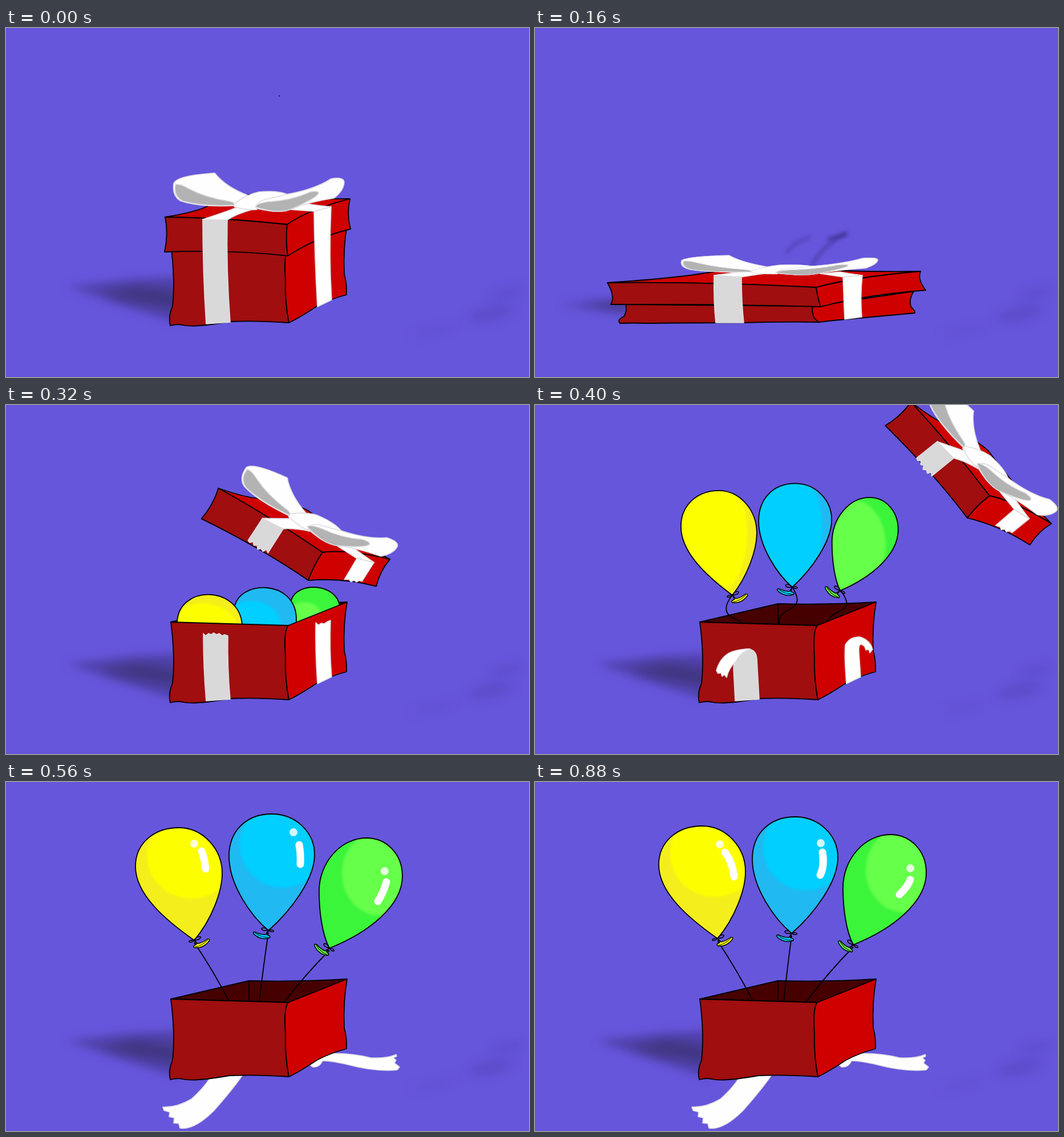
Animation, 917 px wide and 611 px high, one loop 0.96 s. Source, as an HTML page with a canvas:

```html
<!DOCTYPE html>
<html>
<head>
<meta charset="utf-8">
<style>
html, body { margin: 0; overflow: hidden; background: #6656dc; }
canvas { display: block; }
</style>
</head>
<body>
<canvas id="stage" width="917" height="611"></canvas>
<script>
const ctx = document.getElementById('stage').getContext('2d');
const STEP = 80, STEPS = 12;
const RED = '#cf0000', DARK = '#a00e0f', INSIDE = '#470000';
const WHITE = '#fefefe', GREY = '#d9d9d9', EDGE = '#dedee2';

const lerp = (a, b, k) => a + (b - a) * k;
const mix = (a, b, k) => a.map((v, i) => lerp(v, b[i], k));

// Blend two path strings of equal structure
function morph([a, b], k) {
  const end = b.match(/[\d.]+/g);
  let i = 0;
  return a.replace(/[\d.]+/g, v => lerp(+v, +end[i++], k).toFixed(2));
}

function shape(d, fill, stroke = '#000', width = 1.8) {
  const path = new Path2D(d);
  if (fill) { ctx.fillStyle = fill; ctx.fill(path); }
  if (stroke) { ctx.strokeStyle = stroke; ctx.lineWidth = width; ctx.stroke(path); }
}
const ribbon = (d, fill = WHITE) => shape(d, fill, EDGE, 1.6);

function blurred(radius, draw) {
  ctx.save();
  ctx.filter = `blur(${radius}px)`;
  draw();
  ctx.restore();
}

function ellipse(x, y, rx, ry, turn = 0) {
  ctx.beginPath();
  ctx.ellipse(x, y, rx, ry, turn, 0, 7);
}

// Each part: standing shape, flattened shape
const box = {
  shadow: ['M108 453 L210 441 L305 435 L305 518 L205 486Z', 'M42 485 L100 479 L165 475 L165 499 L100 492Z'],
  core: ['M165 465 L230 452 L300 462 L300 492 L230 480Z', 'M90 486 L130 482 L165 482 L165 494 L130 491Z'],
  front: ['M289 380 L495 386 Q487 395 490 440 Q489 480 496 516 Q440 512 392 514 Q330 525 310 520 Q300 518 288 521 Q284 505 292 487 Q297 440 289 380Z',
    'M159 484 L487 487 Q485 495 488 502 Q487 507 498 515 Q440 514 366 516 Q250 516 200 517 Q170 516 149 517 Q143 511 156 505 Q162 495 159 484Z'],
  side: ['M495 386 L598 345 Q591 385 593 430 Q598 450 597 467 Q570 474 545 487 Q515 507 496 516 Q489 480 490 440 Q487 395 495 386Z',
    'M487 487 L664 461 Q655 475 659 488 Q667 495 666 499 Q620 503 545 510 Q520 512 498 515 Q487 507 488 502 Q485 495 487 487Z'],
  top: ['M279 331 Q335 322 355 311 Q425 288 440 292 Q500 300 603 299 Q530 318 493 344 Q380 332 279 331Z',
    'M127 446 Q260 437 316 426 Q370 419 440 420 Q560 428 676 426 Q560 436 493 454 Q300 444 127 446Z'],
  lidFront: ['M279 331 Q380 332 493 344 Q490 370 494 399 Q400 388 278 392 Q285 360 279 331Z',
    'M127 446 Q300 444 493 454 Q495 470 501 488 Q330 483 133 484 Q141 470 127 446Z'],
  lidSide: ['M493 344 Q530 318 603 299 Q597 325 604 352 Q545 366 494 399 Q490 370 493 344Z',
    'M493 454 Q560 436 676 426 Q670 440 685 459 Q580 467 501 488 Q495 470 493 454Z'],
};
const bands = [
  [GREY, 'M345 335 L388 336 Q386 420 393 515 L351 518 Q345 430 345 335Z', 'M314 433 L362 437 Q362 480 366 516 L317 516 Q313 480 314 433Z'],
  [WHITE, 'M345 335 Q385 322 405 314 L432 318 Q405 325 388 336Z', 'M314 433 Q350 428 380 424 L420 428 Q390 431 362 436Z'],
  [WHITE, 'M540 321 L570 313 Q566 400 571 476 L546 488 Q541 400 540 321Z', 'M540 435 L574 433 Q570 470 573 506 L543 510 Q541 470 540 435Z'],
  [WHITE, 'M500 318 L525 307 Q540 310 570 313 L540 321Z', 'M500 430 L535 427 Q550 430 574 433 L540 436Z'],
];

function bow() {
  ribbon('M366 254 Q300 258 294 272 Q291 295 307 303 Q340 314 402 311 L424 293 Q385 278 366 254Z');
  ribbon('M297 274 Q293 294 310 303 Q345 313 400 310 Q402 305 390 303 Q350 297 320 281 Q305 272 297 274Z', '#b3b3b3');
  ribbon('M437 310 Q450 296 493 291 Q540 283 570 264 Q592 260 593 270 Q592 285 575 298 Q530 305 500 317 Q488 322 468 321 Q445 318 437 315Z');
  ribbon('M400 308 Q420 292 443 287 Q475 284 493 291 Q470 297 455 300 Q437 305 440 318 Q420 319 400 313Z');
  ribbon('M437 313 Q440 307 460 304 Q500 302 533 287 Q548 284 548 289 Q545 298 500 317 Q490 322 470 321 Q450 318 437 313Z', '#b3b3b3');
}

function shadow(k) {
  blurred(8, () => shape(morph(box.shadow, k), 'rgba(58,46,122,.5)', null));
  blurred(9, () => shape(morph(box.core, k), 'rgba(55,45,100,.6)', null));
  blurred(9, () => {
    ctx.fillStyle = 'rgba(60,48,140,.22)';
    for (const [x, y, rx, ry] of [[850, 500, 42, 13], [878, 464, 30, 8], [750, 530, 40, 3]]) {
      ellipse(x, y, rx, ry, -.2);
      ctx.fill();
    }
  });
}

function lid(k) {
  shape(morph(box.top, k), RED);
  shape(morph(box.lidFront, k), DARK);
  shape(morph(box.lidSide, k), RED);
}

function closedBox(k) {
  shape(morph(box.front, k), DARK);
  shape(morph(box.side, k), RED);
  lid(k);
  for (const [fill, ...pair] of bands) ribbon(morph(pair, k), fill);
  ctx.save();
  ctx.translate(-81 * k, 267 * k);
  ctx.scale(1 + .15 * k, 1 - .485 * k);
  bow();
  ctx.restore();
}

function flyingLid(x, y, degrees, dx, dy) {
  ctx.save();
  ctx.translate(x, y);
  ctx.rotate(degrees * Math.PI / 180);
  ctx.translate(-493, -344);
  lid(0);
  ctx.translate(dx, dy);
  ribbon('M361 337 L402 335 L398 386 l-5 -4 l-4 6 l-5 -3 l-5 4 l-4 -6 l-5 3 l-4 -5 l-5 4 L357 383Z', GREY);
  ribbon('M361 337 Q390 322 405 314 L445 318 Q420 325 402 336Z');
  ribbon('M540 321 L570 313 L567 352 l-5 1 l-3 5 l-5 -1 l-4 5 l-5 -2 L538 364Z');
  ribbon('M500 318 L525 307 Q540 310 570 313 L540 321Z');
  bow();
  ctx.restore();
}

function inside() {
  shape('M289 380 L426 348 Q520 350 598 345 L495 386Z', INSIDE);
  shape('M426 348 V386');
}

function openBox() {
  shape(box.front[0], DARK);
  shape(box.side[0], RED);
}

function tornBands() {
  ribbon('M346 400 l4 4 l5 -4 l5 2 l4 -3 l5 3 l5 -2 l5 4 l4 -2 L389 404 Q388 460 393 515 L351 518 Q346 460 346 400Z', GREY);
  ribbon('M543 381 l5 4 l5 -3 l5 1 l6 -4 L569 377 Q567 430 571 476 L546 488 Q542 430 543 381Z');
}

function curledBands() {
  ribbon('M348 460 Q350 430 372 427 Q388 427 389 445 L393 515 L351 518Z', GREY);
  ribbon('M318 465 Q325 440 345 432 Q360 427 377 427 Q358 435 353 448 Q340 460 336 477 l-4 -5 l-4 3 l-2 -6 l-5 1Z');
  ribbon('M546 488 Q542 440 544 420 Q552 405 570 406 Q588 412 592 428 l-5 6 l-2 -6 l-5 1 l-2 -6 Q567 412 568 432 L571 476Z');
}

function fallenBands() {
  ribbon('M360 515 L414 514 Q400 535 365 575 Q330 610 305 606 l-2 -8 l-9 -1 l1 -9 l-9 -2 l1 -8 l-10 -3 L275 569 Q300 570 325 555 Q345 538 360 515Z');
  ribbon('M530 493 Q550 480 560 476 Q600 473 640 483 Q670 484 684 477 l1 3 l-6 3 l5 4 l-3 5 L690 499 L686 504 Q650 508 600 495 Q570 488 555 488 Q550 500 538 499Z');
}

// tips: knot x, y and string end x for each step; light: ellipse seen first and later
const balloons = [
  { fill: '#66ff4a', shade: '#3bf53b', flip: -1, tilt: -.2, scale: [.795, .845],
    dome: 'M500 386 V342 C510 308 580 312 585 352 V386Z', spot: [522, 370, 32, 25],
    body: 'M0 0 C-13 -25 -18 -65 -18 -100 C-18 -150 20 -193 65 -193 C100 -193 128 -165 128 -126 C128 -75 70 -28 0 0Z',
    wave: 'M536 325 C555 350 545 357 530 363 Q515 370 513 380',
    light: [[20, -80, 60, 80], [88, -131, 66, 74]],
    tips: [[535, 325, 513], [551, 308, 500], [567, 291, 488], [573, 289, 490], [565, 288, 484], [562, 286, 480], [558, 285, 475]],
    shines: [[97, -135, 100, -116, 95, -98, 85, -82], [96, -130, 96, -113, 96, -95, 79, -74], [100, -134, 100, -114, 96, -102, 81, -88]] },
  { fill: '#00cfff', shade: '#21b9f2', flip: -1, tilt: .2, scale: [.853, .89],
    dome: 'M401 390 V352 C412 306 506 306 509 372 V390Z', spot: [430, 385, 52, 42],
    body: 'M0 0 C-30 -25 -69 -80 -69 -130 C-69 -175 -38 -204 6 -204 C48 -204 81 -172 81 -133 C81 -90 40 -35 0 0Z',
    wave: 'M452 320 C464 340 463 350 443 360 Q426 368 428 384',
    light: [[-17, -104, 70, 110], [25, -150, 75, 75]],
    tips: [[451, 319, 428], [456, 288, 438], [460, 260, 444], [460, 274, 446], [460, 287, 448], [455, 276, 442], [450, 265, 436]],
    shines: [[44, -172, 54, -150, 57, -135, 56, -116], [43, -164, 53, -146, 56, -126, 51, -106], [51, -158, 54, -142, 58, -118, 50, -102]] },
  { fill: '#fdff00', shade: '#f4ee1c', flip: 1, tilt: 0, scale: [.875, .93],
    dome: 'M300 390 V381 C302 315 408 315 414 384 V390Z', spot: [345, 395, 62, 48],
    body: 'M0 0 C-50 -35 -103 -80 -103 -129 C-103 -170 -70 -197 -27 -197 C15 -197 49 -160 49 -117 C49 -85 30 -35 0 0Z',
    wave: 'M346 333 C332 350 330 366 350 374 Q362 379 366 384',
    light: [[-36, -108, 62, 110], [-5, -149, 78, 76]],
    tips: [[346, 333, 366], [338, 304, 380], [330, 277, 392], [339, 271, 402], [348, 265, 413], [334, 270, 398], [320, 274, 383]],
    shines: [[0, -169, 13, -156, 18, -143, 20, -125], [-5, -165, 12, -150, 21, -132, 25, -105], [4, -165, 13, -151, 26, -135, 29, -108]] },
];

function shaded(d, b, light) {
  ctx.save();
  ctx.clip(new Path2D(d));
  shape(d, b.shade, null);
  blurred(2, () => {
    ctx.fillStyle = b.fill;
    ellipse(...light);
    ctx.fill();
  });
  ctx.restore();
  shape(d);
}

function knot(b) {
  ctx.save();
  ctx.scale(b.flip, 1);
  ctx.rotate(b.tilt);
  shape('M0 0 L6 6 Q14 5 23 -2 Q30 -3 24 4 Q14 15 0 13 Q-3 10 4 7Z', b.fill, '#000', 1.5);
  shape('M1 12 Q14 10 24 -1', null, '#000', 1);
  shape('M0 0 Q5 -8 11 -6 Q12 -1 0 0 Q-9 -1 -9 3 Q-5 5 0 0', null, '#000', 1.5);
  ctx.restore();
}

function shine([x, y, x1, y1, cx, cy, x2, y2]) {
  ctx.fillStyle = 'rgba(255,255,255,.82)';
  ellipse(x, y, 7, 7);
  ctx.fill();
  ctx.lineCap = 'round';
  shape(`M${x1} ${y1} Q${cx} ${cy} ${x2} ${y2}`, null, WHITE, 13);
  ctx.lineCap = 'butt';
}

function balloon(b, n) {
  const [x, y, end] = b.tips[n];
  const grown = Math.min(1, n / 2);
  const [sx, sy] = mix(b.scale, [1, 1], grown);
  shape(n ? `M${x} ${y + 4} Q${lerp(x, end, .52)} ${lerp(y, 384, .48)} ${end} 385` : b.wave);
  let i = 0;
  const d = b.body.replace(/-?\d+/g, v => v * (i++ % 2 ? sy : sx));
  ctx.save();
  ctx.translate(x, y);
  shaded(d, b, mix(...b.light, grown));
  knot(b);
  if (n > 1) {
    const s = (n - 2) / 2, from = Math.floor(s);
    shine(mix(b.shines[from], b.shines[Math.ceil(s)], s - from));
  }
  ctx.restore();
}

function smudges() {
  blurred(3, () => {
    shape('M440 395 Q452 376 482 366', null, 'rgba(45,35,110,.25)', 7);
    shape('M486 416 Q500 385 546 358', null, 'rgba(45,35,110,.4)', 6);
    shape('M513 370 L547 361', null, 'rgba(45,35,110,.5)', 6);
  });
}

function draw(step) {
  const squash = [0, .5, 1, -.12][step] || 0;
  ctx.fillStyle = '#6656dc';
  ctx.fillRect(0, 0, 917, 611);
  shadow(squash);
  if (step < 4) {
    if (step === 0) {
      ctx.fillStyle = '#000';
      ellipse(479, 119, 1, 1);
      ctx.fill();
    }
    if (step === 2) smudges();
    closedBox(squash);
    return;
  }
  inside();
  for (const b of balloons) step === 4 ? shaded(b.dome, b, b.spot) : balloon(b, step - 5);
  if (step > 5) fallenBands();
  openBox();
  if (step === 4) {
    tornBands();
    flyingLid(555, 258, 28.1, 11, 4);
  } else if (step === 5) {
    curledBands();
    flyingLid(797, 159, 46.5, 0, 8);
  }
}

ctx.lineJoin = 'round';
const start = performance.now();
function frame() {
  draw(Math.floor((performance.now() - start) / STEP) % STEPS);
  requestAnimationFrame(frame);
}
frame();
</script>
</body>
</html>
```
